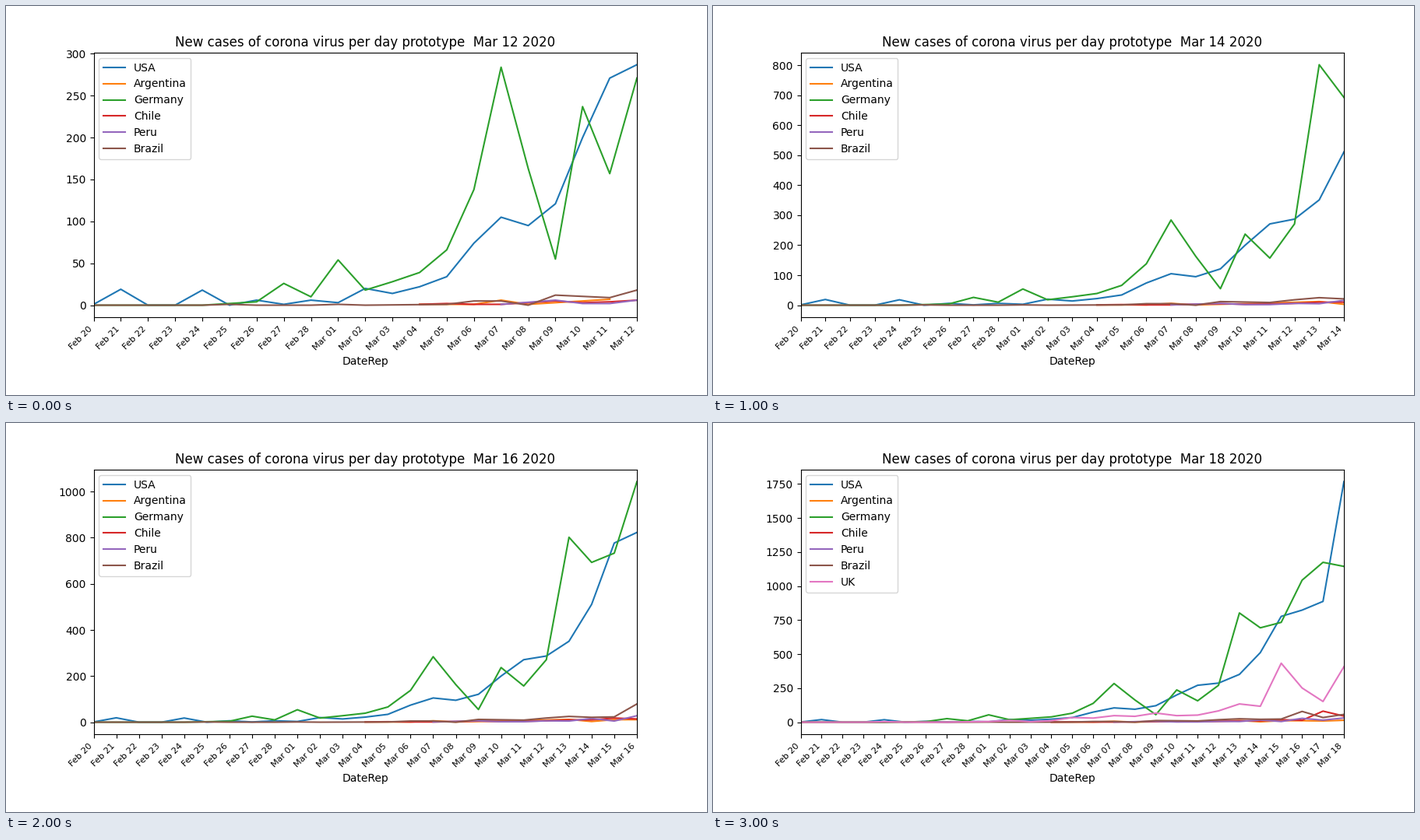
A matplotlib script for the animation above (4 s loop, 900x500 px).

```python
import matplotlib.pyplot as plt
import numpy as np
from matplotlib.animation import FuncAnimation

GAP = np.nan  # day without a report; the line bridges it

DAYS = [f"Feb {d}" for d in range(20, 29)] + [f"Mar {d:02d}" for d in range(1, 19)]

# country: (first day reported, new cases per day)
CASES = {
    "USA": ("Feb 20", [1, 19, 0, 0, 18, 0, 6, 1, 6, 3, 20, 14, 22, 34, 74, 105, 95,
                       121, 200, 271, 287, 351, 511, 777, 823, 887, 1766]),
    "Argentina": ("Mar 04", [1, GAP, 1, 6, 1, 3, GAP, 7, GAP, 12, 3, 11, 11, 9, 14]),
    "Germany": ("Feb 20", [0, 0, 0, 0, 0, 2, 4, 26, 10, 54, 18, 28, 39, 66, 138, 284, 163,
                           55, 237, 157, 271, 802, 693, 733, 1043, 1174, 1144]),
    "Chile": ("Mar 04", [1, 2, 1, 1, GAP, 5, 3, 4, 6, 10, 10, 18, 14, 81, 45]),
    "Peru": ("Mar 07", [1, GAP, 6, 2, 2, 6, 5, 16, 5, 28, 15, 31]),
    "Brazil": ("Feb 20", [0, 0, 0, 0, 0, 1, 0, 0, 0, 1, 0, GAP, GAP, 1, 5, 5, 0,
                          12, GAP, 9, 18, 25, 21, 23, 79, 34, 57]),
    "UK": ("Feb 20", [0, 0, 0, 0, 4, 0, 0, 0, 3, 5, 13, 4, 11, 34, 30, 48, 43,
                      67, 48, 52, 83, 134, 117, 433, 251, 152, 407]),
}
LAST_DAYS = ["Mar 12", "Mar 14", "Mar 16", "Mar 18"]
UK_JOINS = "Mar 18"

fig, ax = plt.subplots(figsize=(9, 5), dpi=100)
fig.subplots_adjust(left=0.125, right=0.9, bottom=0.2, top=0.88)


def plot_country(name, last):
    first_day, values = CASES[name]
    y = np.array(values, dtype=float)
    x = DAYS.index(first_day) + np.arange(len(y))
    shown = (x <= last) & ~np.isnan(y)
    ax.plot(x[shown], y[shown], label=name)


def draw(step):
    ax.clear()
    last_day = LAST_DAYS[step]
    last = DAYS.index(last_day)
    for name in CASES:
        if name != "UK" or last_day == UK_JOINS:
            plot_country(name, last)
    ax.set_xlim(0, last)
    ax.set_xticks(range(last + 1), DAYS[:last + 1], rotation=45, ha="right", fontsize=8)
    ax.set_xlabel("DateRep")
    ax.set_title(f"New cases of corona virus per day prototype  {last_day} 2020")
    ax.legend(loc="upper left")
    return []


anim = FuncAnimation(fig, draw, frames=len(LAST_DAYS), init_func=lambda: [],
                     interval=1000, repeat=True, repeat_delay=0)
plt.show()
```
